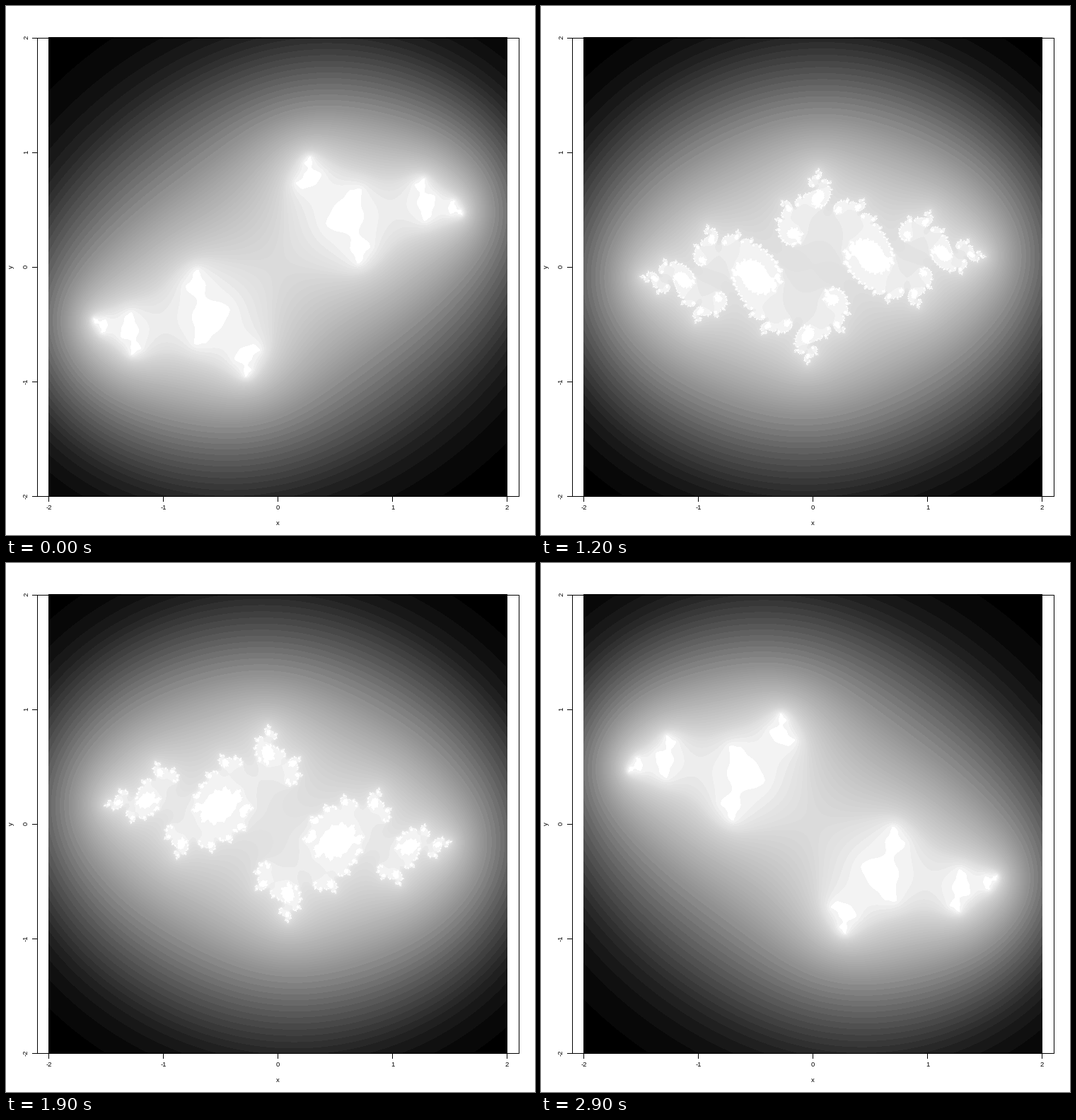
Write a matplotlib script that moves like this. It is 748 px wide and 748 px high and loops after 3 s.

```python
import numpy as np
import matplotlib.pyplot as plt
from matplotlib.animation import FuncAnimation

SIZE = 748            # stage in pixels
DPI = 100
FRAMES = 30
LEFT, TOP, SIDE = 60, 44, 649
UNIT = 162            # pixels per axis unit
MAX_ITER = 250
ESCAPE = 1e3

# Grey steps: banded shadows, fine midtones, coarse highlights.
LEVELS = np.concatenate([np.arange(0, 145, 8), np.arange(147, 232, 3), [237, 243, 255]])


def escape_times(c):
    """Smooth escape time on the upper half of the grid, y = 2 down to 0."""
    axis = np.linspace(-2, 2, SIDE)
    half = SIDE // 2 + 1
    z = (axis[None, :] + 1j * axis[::-1][:half, None]).ravel()
    times = np.full(z.size, float(MAX_ITER))
    active = np.arange(z.size)
    for n in range(MAX_ITER):
        z = z * z + c
        size2 = z.real ** 2 + z.imag ** 2
        out = size2 > ESCAPE ** 2
        if out.any():
            times[active[out]] = n - np.log2(0.5 * np.log(size2[out]))
            z, active = z[~out], active[~out]
    return times.reshape(half, SIDE)


def shade(times):
    """Equalise the values by rank, then snap them to the grey steps."""
    ordered = np.sort(times, axis=None)
    grey = 255 * np.searchsorted(ordered, times, side="right") / ordered.size
    edges = (LEVELS[1:] + LEVELS[:-1]) / 2
    return LEVELS[np.digitize(grey, edges)]


def julia(c):
    upper = shade(escape_times(c))
    # The set is unchanged by a half turn.
    return np.vstack([upper, upper[:-1][::-1, ::-1]])


imag = np.linspace(-1, 1, FRAMES)
pictures = [julia(-0.77 + 1j * b) for b in imag[:FRAMES // 2]]
# Conjugate parameters give mirrored pictures.
pictures += [p[::-1] for p in reversed(pictures)]

fig = plt.figure(figsize=(SIZE / DPI, SIZE / DPI), dpi=DPI, facecolor="white")
field = fig.add_axes([LEFT / SIZE, (SIZE - TOP - SIDE) / SIZE, SIDE / SIZE, SIDE / SIZE])
field.set_axis_off()
image = field.imshow(pictures[0], cmap="gray", vmin=0, vmax=255,
                     interpolation="nearest", aspect="auto")

over = fig.add_axes([0, 0, 1, 1])
over.set_xlim(0, SIZE)
over.set_ylim(SIZE, 0)
over.set_axis_off()


def line(xs, ys):
    over.plot(np.array(xs) + 0.5, np.array(ys) + 0.5, color="black",
              lw=72 / DPI, antialiased=False, solid_capstyle="butt",
              solid_joinstyle="miter")


def label(x, y, text, turn=0):
    over.text(x, y, text, fontsize=9.5 * 72 / DPI, family="Liberation Sans",
              ha="center", va="center", rotation=turn, color="black")


line([44, 725, 725, 44, 44], [44, 44, 692, 692, 44])
for v in range(-2, 3):
    x, y = 384 + UNIT * v, 368 - UNIT * v
    line([x, x], [692, 699])
    line([37, 44], [y, y])
    label(x + 0.5, 710, str(v))
    label(28.5, y + 0.5, str(v), 90)
label(384, 732, "x")
label(7.5, 368.5, "y", 90)


def update(k):
    image.set_data(pictures[k])
    return [image]


anim = FuncAnimation(fig, update, frames=FRAMES, interval=100, repeat=True,
                     repeat_delay=0, blit=False)
plt.show()
```
